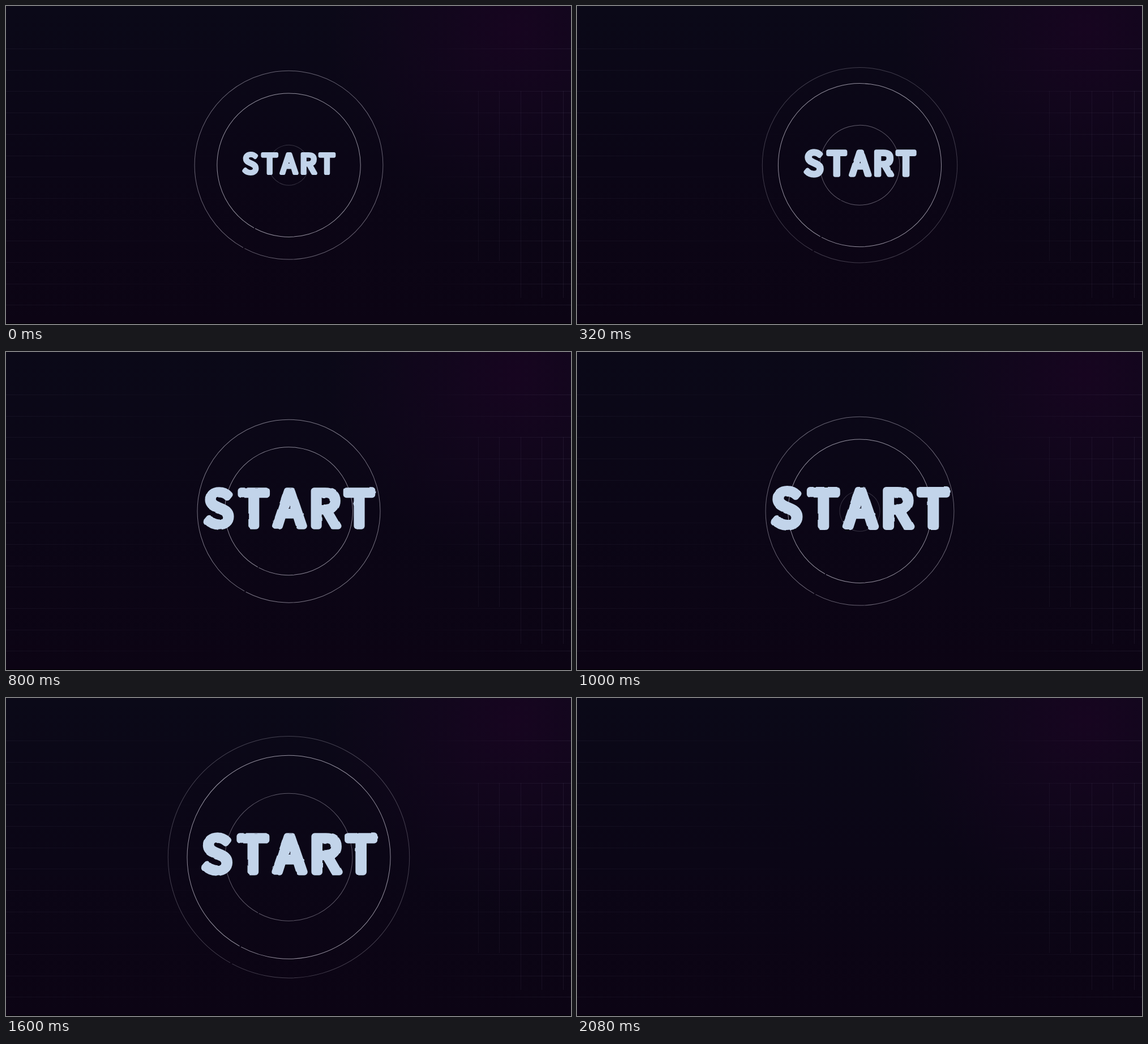
An HTML page that plays this animation: 998x561 px, repeating every 2320 ms.

```html
<!DOCTYPE html>
<html lang="en">
<head>
<meta charset="utf-8">
<title>Start</title>
<style>
html, body { margin: 0; width: 100%; height: 100%; overflow: hidden; background: #0b0516; }
svg { display: block; width: 100vw; height: 100vh; }
#word {
  font: 400 89px "Noto Sans CJK JP", "Noto Sans CJK SC", "Open Sans", sans-serif;
  text-anchor: middle;
  fill: #c2d4ea; stroke: #c2d4ea; stroke-width: 12; stroke-linejoin: round;
}
</style>
</head>
<body>
<svg viewBox="0 0 998 561">
  <defs>
    <linearGradient id="base" x2="0" y2="1">
      <stop stop-color="#0b0918"/><stop offset=".5" stop-color="#0b0616"/><stop offset="1" stop-color="#0c0414"/>
    </linearGradient>
    <radialGradient id="glow" gradientUnits="userSpaceOnUse" cx="900" cy="40" r="330">
      <stop stop-color="#170520"/><stop offset="1" stop-color="#170520" stop-opacity="0"/>
    </radialGradient>
    <linearGradient id="fade" gradientUnits="userSpaceOnUse" x1="0" x2="998" y1="0" y2="0">
      <stop stop-color="#9a90b8" stop-opacity=".07"/>
      <stop offset=".42" stop-color="#9a90b8" stop-opacity="0"/>
      <stop offset=".72" stop-color="#9a90b8" stop-opacity="0"/>
      <stop offset="1" stop-color="#9a90b8" stop-opacity=".11"/>
    </linearGradient>
    <filter id="rough" color-interpolation-filters="sRGB">
      <feTurbulence type="fractalNoise" baseFrequency=".04" numOctaves="2" seed="4"/>
      <feDisplacementMap in="SourceGraphic" scale="3" xChannelSelector="R" yChannelSelector="G"/>
    </filter>
  </defs>
  <rect width="998" height="561" fill="url(#base)"/>
  <rect width="998" height="561" fill="url(#glow)"/>
  <g id="grid"></g>
  <rect y="560" width="998" height="1"/>
  <g id="rings" fill="none" stroke="#d6d2e0"></g>
  <g id="label">
    <text id="word" x="-130.5 -64.5 2 67 132" y="28" filter="url(#rough)">START</text>
  </g>
</svg>
<script>
const LOOP = 2320, STEP = 40, CX = 499.5, CY = 280.7;
const HOLD = 1.3, EXIT = 1.44; // seconds: rings stop fading, everything leaves
const byId = id => document.getElementById(id);

function add(parent, tag, attrs) {
  const el = document.createElementNS("http://www.w3.org/2000/svg", tag);
  for (const key in attrs) el.setAttribute(key, attrs[key]);
  return parent.appendChild(el);
}

const grid = byId("grid");
for (let y = 75; y < 540; y += 37.7)
  add(grid, "rect", { y: Math.round(y), width: 998, height: 1, fill: "url(#fade)" });
for (let i = 0; i < 5; i++)
  add(grid, "rect", {
    x: Math.floor(834 + 37.5 * i), y: 150, width: 1, height: i < 2 ? 300 : 365,
    fill: "#9a90b8", opacity: .06 + .01 * i
  });

// One ring is born every second
const rings = [-2, -1, 0, 1].map(start => ({
  start,
  el: add(byId("rings"), "circle", {
    cx: CX, cy: CY, pathLength: 360, "stroke-dasharray": "359 1", transform: `rotate(119 ${CX} ${CY})`
  })
}));

const radius = age => 184 * Math.tanh(.195 + .65 * age);
const opacity = age => age > -.3 && age < 2.7 ? .68 * Math.sin(Math.PI * (age + .3) / 3) : 0;

function wordWidth(t, exit) {
  const grown = 1 - Math.exp(-4.3 * Math.max(0, t - .08) ** 2);
  return (166 + 156 * grown) * Math.max(0, 1 - (exit / .52) ** 3);
}

function draw(t) {
  const exit = Math.max(0, t - EXIT), push = 2930 * exit ** 3;
  for (const { start, el } of rings) {
    const age = t - start;
    el.setAttribute("r", Math.max(0, radius(age) + push * 1.55 ** age));
    el.setAttribute("opacity", opacity(Math.min(t, HOLD) - start));
  }
  const scale = wordWidth(t, exit) / 322;
  byId("label").setAttribute("transform", `translate(499 280.3) scale(${scale})`);
  byId("label").setAttribute("visibility", scale > 0 ? "visible" : "hidden");
}

const begin = performance.now();
function tick() {
  const ms = (performance.now() - begin) % LOOP;
  draw(Math.floor(ms / STEP) * STEP / 1000);
  requestAnimationFrame(tick);
}
tick();
</script>
</body>
</html>
```
